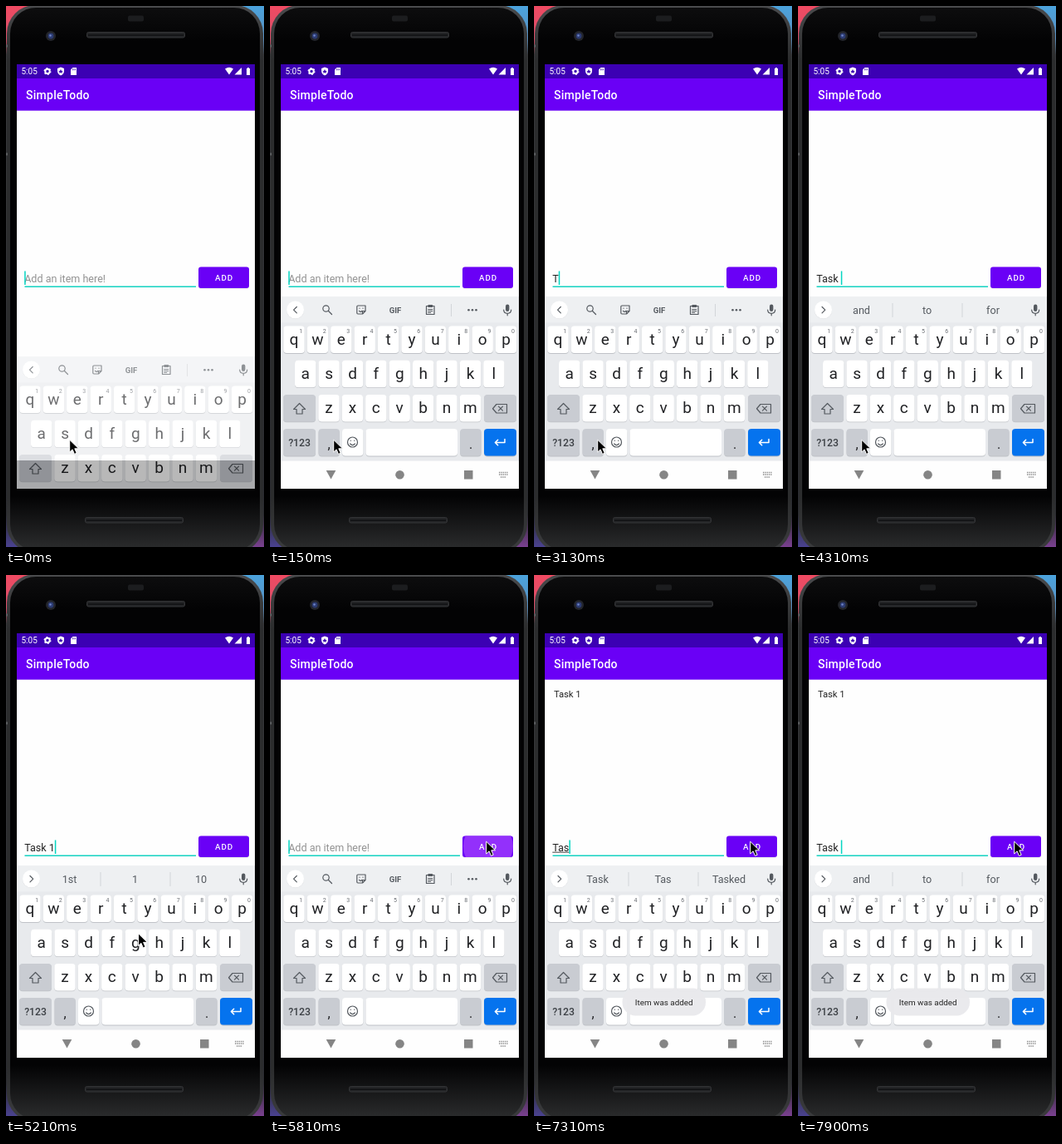
An HTML page for the animation above (8 s loop, 311 by 650 pixels).

```html
<!DOCTYPE html>
<html lang="en">
<head>
<meta charset="utf-8">
<title>Todo app</title>
<style>
  html, body { margin: 0; width: 100%; height: 100%; overflow: hidden; background: #111; }
  svg { display: block; width: 311px; height: 650px; font-family: Roboto, "Open Sans", sans-serif; }
  .mid { text-anchor: middle; }
  .line { fill: none; stroke: #54595f; stroke-width: 1.2; stroke-linecap: round; stroke-linejoin: round; }
  .field { font-size: 12.56px; }
</style>
</head>
<body>
<svg viewBox="0 0 311 650">
  <defs>
    <linearGradient id="wallLeft" x2="0" y2="1">
      <stop offset="0" stop-color="#f04a62"/><stop offset=".06" stop-color="#d8506a"/>
      <stop offset=".09" stop-color="#38393b"/><stop offset=".94" stop-color="#2a2b30"/><stop offset="1" stop-color="#4a4290"/>
    </linearGradient>
    <linearGradient id="wallRight" x2="0" y2="1">
      <stop offset="0" stop-color="#4ba3dc"/><stop offset=".06" stop-color="#5a8fc0"/>
      <stop offset=".09" stop-color="#38393b"/><stop offset=".94" stop-color="#2a2b30"/><stop offset="1" stop-color="#7a4090"/>
    </linearGradient>
    <linearGradient id="rim" x2="0" y2="1">
      <stop offset="0" stop-color="#4a4b4d"/><stop offset=".1" stop-color="#2b2c2d"/>
      <stop offset=".9" stop-color="#2b2c2d"/><stop offset="1" stop-color="#3c3d3f"/>
    </linearGradient>
    <linearGradient id="face" x2="0" y2="1">
      <stop offset="0" stop-color="#0d0d0e"/><stop offset=".06" stop-color="#030304"/>
      <stop offset=".9" stop-color="#030304"/><stop offset="1" stop-color="#2c2d2e"/>
    </linearGradient>
    <clipPath id="screen"><rect x="13" y="70" width="287" height="510"/></clipPath>
    <clipPath id="button"><rect x="232" y="313.5" width="61" height="25.5" rx="3"/></clipPath>
  </defs>

  <!-- phone -->
  <rect width="156" height="650" fill="url(#wallLeft)"/>
  <rect x="156" width="155" height="650" fill="url(#wallRight)"/>
  <rect x="1" y="-1" width="309" height="658" rx="34" fill="url(#rim)"/>
  <rect x="5" y="2" width="301" height="652" rx="31" fill="url(#face)"/>
  <path d="M0 48h2M0 178h2" stroke="#5a5c5f" stroke-width="3"/>
  <rect x="147" y="11.5" width="19" height="7" rx="2" fill="#1c1d1f"/>
  <g fill="#242527" stroke="#333436">
    <rect x="97.5" y="31.5" width="118" height="6.5" rx="2"/>
    <rect x="95.5" y="614.5" width="118" height="6.5" rx="2"/>
  </g>
  <path d="M99 35h115M97 618h115" stroke="#141517" stroke-width="2"/>
  <circle cx="54" cy="36" r="6" fill="#23252b"/>
  <circle cx="54" cy="36" r="3.4" fill="#2c3b72"/>
  <circle cx="53.5" cy="35.5" r="1.3" fill="#6e85c8"/>

  <g clip-path="url(#screen)">
    <rect x="13" y="70" width="287" height="510" fill="#fefefe"/>
    <rect x="13" y="87" width="287" height="38.7" fill="#6a00f6"/>
    <rect x="13" y="70" width="287" height="17" fill="#3c00b3"/>
    <g fill="#fff">
      <text x="18.5" y="82" font-size="10">5:05</text>
      <circle cx="50" cy="78.5" r="2.7" fill="none" stroke="#fff" stroke-width="2"/>
      <circle cx="50" cy="78.5" r="3.9" fill="none" stroke="#fff" stroke-width="1.2" stroke-dasharray="1.8 2.3"/>
      <path d="M66 73.5l4 1.6v3q0 3.7-4 5.4-4-1.7-4-5.4v-3z"/>
      <path d="M80.5 74h4.5v9h-7v-6.5z"/>
      <path d="M264 75.5q5-3.5 10 0l-5 7zM284 74v8.5h-8.5zM290 75h1v-1h2v1h1v8h-4z"/>
      <text x="24" y="112" font-size="14" font-weight="500" letter-spacing=".27">SimpleTodo</text>
    </g>
    <path d="M66 76l1 2 1.7.2-1.3 1.2.4 1.7-1.8-1-1.8 1 .4-1.7-1.3-1.2 1.7-.2z" fill="#3c00b3"/>
    <path d="M80.5 75.3v2M82 75.3v2M83.5 75.3v2" stroke="#3c00b3" stroke-width=".7"/>

    <text id="item" x="24" y="147" font-size="11.17" fill="#232323">Task 1</text>
    <text id="hint" class="field" x="22.2" y="331.5" fill="#929292">Add an item here!</text>
    <text id="typed" class="field" x="22.2" y="331.5" fill="#222" xml:space="preserve"></text>
    <rect id="composing" x="22.2" y="332.7" height=".9" fill="#333"/>
    <rect x="22.5" y="336.5" width="206.5" height="1.4" fill="#03d0bd"/>
    <rect id="caret" y="318.5" width="1.5" height="16.5" fill="#03d5c1"/>

    <rect x="232" y="314.2" width="61" height="25.5" rx="3" fill="#000" opacity=".1"/>
    <rect x="232" y="313.5" width="61" height="25.5" rx="3" fill="#6a00f6"/>
    <g clip-path="url(#button)"><circle id="ripple" cx="263" cy="326" fill="#9330fb"/></g>
    <text class="mid" x="263" y="330" font-size="9.8" font-weight="500" letter-spacing=".87" fill="#fff">ADD</text>

    <g id="keyboard">
      <rect x="13" y="349.5" width="287" height="235" fill="#e8eaed"/>
      <rect x="13" y="349.5" width="287" height="31" fill="#eef0f2"/>
      <circle cx="30.5" cy="365.7" r="10.5" fill="#dcdfe2"/>
      <circle cx="30.5" cy="365" r="10.5" fill="#fff"/>
      <path id="chevron" class="line"/>
      <g id="tools">
        <g class="line">
          <circle cx="67.5" cy="363.5" r="3.7"/><path d="M70.5 366.5l4 4"/>
          <path d="M106 360h9v6.5l-3.5 3.5H106q-1.2 0-1.2-1.2v-7.6q0-1.2 1.2-1.2zM115 366.5h-3.5v3.5M107.500 366.300q1.700 2 3.300 0M108 363v.2M112 363v.2"/>
          <path d="M188.5 360.5h9.5v10h-9.5zM191 359.5h4.5v2H191zM190.7 364.5h5M190.7 366.5h5M190.7 368.5h3"/>
        </g>
        <text class="mid" x="151" y="368.5" font-size="9.5" font-weight="700" fill="#54595f">GIF</text>
        <path d="M218.5 358v15" stroke="#d2d5d9"/>
        <g fill="#54595f"><circle cx="239.5" cy="365.3" r="1.3"/><circle cx="244" cy="365.3" r="1.3"/><circle cx="248.5" cy="365.3" r="1.3"/></g>
      </g>
      <g id="words" class="mid" font-size="12.6" fill="#555a60">
        <path d="M114 357v17M198 357v17" stroke="#d2d5d9"/>
        <text x="76.5" y="369.7"></text><text x="155.5" y="369.7"></text><text x="235" y="369.7"></text>
      </g>
      <rect x="284" y="358.5" width="4.4" height="8.5" rx="2.2" fill="#54595f"/>
      <path class="line" d="M281.7 365q0 4.3 4.5 4.3t4.5-4.3M286.2 369.3v2.5"/>
      <g id="keys"></g>
      <g class="line">
        <path d="M35.5 477.5l7 7h-3.5v5.5h-7v-5.5H28.5z"/>
        <path d="M273 478.5h12.5v10.5H273l-4.5-5.25zM275.5 481.2l5 5M280.5 481.2l-5 5"/>
        <circle cx="99.500" cy="524" r="6"/><path d="M96.7 526q2.8 3.2 5.6 0M97.3 522v.3M101.7 522v.3"/>
        <path d="M283 520.5v4h-11.5M274.7 521.2l-3.3 3.3 3.3 3.3" style="stroke:#fff;stroke-width:1.5"/>
      </g>
    </g>

    <g id="entering">
      <rect x="13" y="421" width="287" height="125" fill="#fff" opacity=".34"/>
      <rect x="13" y="546" width="287" height="34" opacity=".28"/>
    </g>
    <g id="nav" fill="#858585">
      <rect x="13" y="546.5" width="287" height="34" fill="#fefefe"/>
      <path d="M67.7 558h11.6l-5.8 10.5zM234 558h10.5v10.5H234z"/>
      <circle cx="156.5" cy="563.3" r="5.3"/>
      <path d="M276 560.5h10.5M276 563h10.5M278 566h6" stroke="#858585" stroke-width="1.3" stroke-dasharray="1.3 1"/>
    </g>
    <g id="toast">
      <rect x="106.5" y="496.5" width="100.5" height="33" rx="16" fill="#e9e9ec" opacity=".94"/>
      <text class="mid" x="156.7" y="516.5" font-size="9.9" fill="#242424">Item was added</text>
    </g>
  </g>
  <path id="mouse" d="M0 0v14.8l3.4-3.2 2.4 5.6 2.7-1.2-2.4-5.4h4.7z" fill="#000" stroke="#fff" stroke-width="1"/>
</svg>

<script>
const $ = id => document.getElementById(id);

// Keyboard keys
const PITCH = 28.4, KEY = 25.4, GREY = '#c9ccd2';
let markup = '';
function key(x, y, width, fill = '#fff') {
  const box = (dy, color) =>
    `<rect x="${x}" y="${y + dy}" width="${width}" height="32.5" rx="4" fill="${color}"/>`;
  markup += box(.9, '#bfc2c7') + box(0, fill);
}
function label(text, x, y, size, color = '#202124', weight = 400) {
  markup += `<text class="mid" x="${x}" y="${y}" font-size="${size}" fill="${color}" font-weight="${weight}">${text}</text>`;
}
[['qwertyuiop', 29, 384.5], ['asdfghjkl', 42.7, 425.7], ['zxcvbnm', 71, 466.9]].forEach(([letters, x0, y], row) =>
  [...letters].forEach((letter, i) => {
    const x = x0 + i * PITCH;
    key(x - KEY / 2, y, KEY);
    label(letter, x, y + 22.3, 19);
    if (row === 0) label((i + 1) % 10, x + 8.3, y + 8, 7, '#686c72');
  }));
for (const [x, y, width, fill] of [
  [16, 466.9, 39, GREY], [258, 466.9, 39, GREY],
  [16, 508, 39, GREY], [58.5, 508, KEY, GREY], [87, 508, KEY], [115.5, 508, 110.5],
  [229.2, 508, KEY, GREY], [258, 508, 39, '#0573ee']
]) key(x, y, width, fill);
label('?123', 35.5, 528.5, 12.2, '#3c4045', 500);
label(',', 71, 532, 16);
label('.', 242, 532, 16);
$('keys').innerHTML = markup;

// Each step changes part of the state from its time on
const NEXT = ['and', 'to', 'for'], T = ['The', 'To', 'This'], TA = ['Take', 'Ta', 'Taking'],
  TAS = ['Task', 'Tas', 'Tasked'], TASK = ['Tasks', 'Task', 'Tasked'];
const STEPS = [
  [0, { slide: 72, text: '', caret: 1, words: null, line: 0, mouse: 0, ripple: 0, glow: 1, item: 0, toast: 0 }],
  [150, { slide: 0 }],
  [300, { caret: 0 }],
  [890, { caret: 1 }],
  [1340, { caret: 0 }],
  [1790, { caret: 1 }],
  [2390, { caret: 0 }],
  [2840, { caret: 1 }],
  [3130, { text: 'T' }],
  [3280, { words: T, line: 1 }],
  [3570, { text: 'Ta' }],
  [3870, { words: TA }],
  [4010, { text: 'Tas', words: TAS }],
  [4160, { text: 'Task', words: TASK }],
  [4310, { text: 'Task ', words: NEXT, line: 0 }],
  [4910, { text: 'Task 1', words: ['1st', '1', '10'] }],
  [5060, { mouse: .12 }],
  [5210, { mouse: .45 }],
  [5360, { mouse: .8 }],
  [5510, { mouse: 1, caret: 0 }],
  [5660, { ripple: 14 }],
  [5810, { text: '', caret: 1, words: null, ripple: 30 }],
  [5960, { item: 1, ripple: 40, glow: .6 }],
  [6110, { ripple: 0, toast: .4 }],
  [6260, { toast: 1 }],
  [6410, { caret: 0 }],
  [6710, { text: 'T', caret: 1 }],
  [7010, { words: T, line: 1 }],
  [7160, { text: 'Ta', words: TA }],
  [7300, { text: 'Tas', words: TAS }],
  [7450, { text: 'Task', words: TASK }],
  [7600, { text: 'Task ' }],
  [7900, { words: NEXT, line: 0 }]
];
const LOOP = 8000;
const show = (id, on) => $(id).setAttribute('visibility', on ? 'visible' : 'hidden');

function draw(s) {
  $('typed').textContent = s.text;
  const width = s.text ? $('typed').getComputedTextLength() : 0;
  $('caret').setAttribute('x', 22.2 + width);
  $('composing').setAttribute('width', width);
  show('caret', s.caret);
  show('composing', s.line);
  show('hint', !s.text);
  show('item', s.item);

  show('tools', !s.words);
  show('words', s.words);
  $('words').querySelectorAll('text').forEach((el, i) => { el.textContent = s.words ? s.words[i] : ''; });
  $('chevron').setAttribute('d', s.words ? 'M29 361.5l3.7 3.7-3.7 3.7' : 'M32.2 361.5l-3.7 3.7 3.7 3.7');

  $('keyboard').setAttribute('transform', `translate(0 ${s.slide})`);
  show('entering', s.slide);
  show('nav', !s.slide);
  $('ripple').setAttribute('r', s.ripple);
  $('ripple').setAttribute('opacity', s.glow);
  $('toast').setAttribute('opacity', s.toast);
  $('mouse').setAttribute('transform', `translate(${76.7 + 184 * s.mouse} ${521.2 - 201 * s.mouse})`);
}

const states = [];
STEPS.forEach(([, change], i) => states.push({ ...states[i - 1], ...change }));
const start = performance.now();
let current = -1;
function tick() {
  const time = Math.max(0, performance.now() - start) % LOOP;
  const index = STEPS.findLastIndex(([at]) => at <= time);
  if (index !== current) draw(states[current = index]);
  requestAnimationFrame(tick);
}
tick();
</script>
</body>
</html>
```
